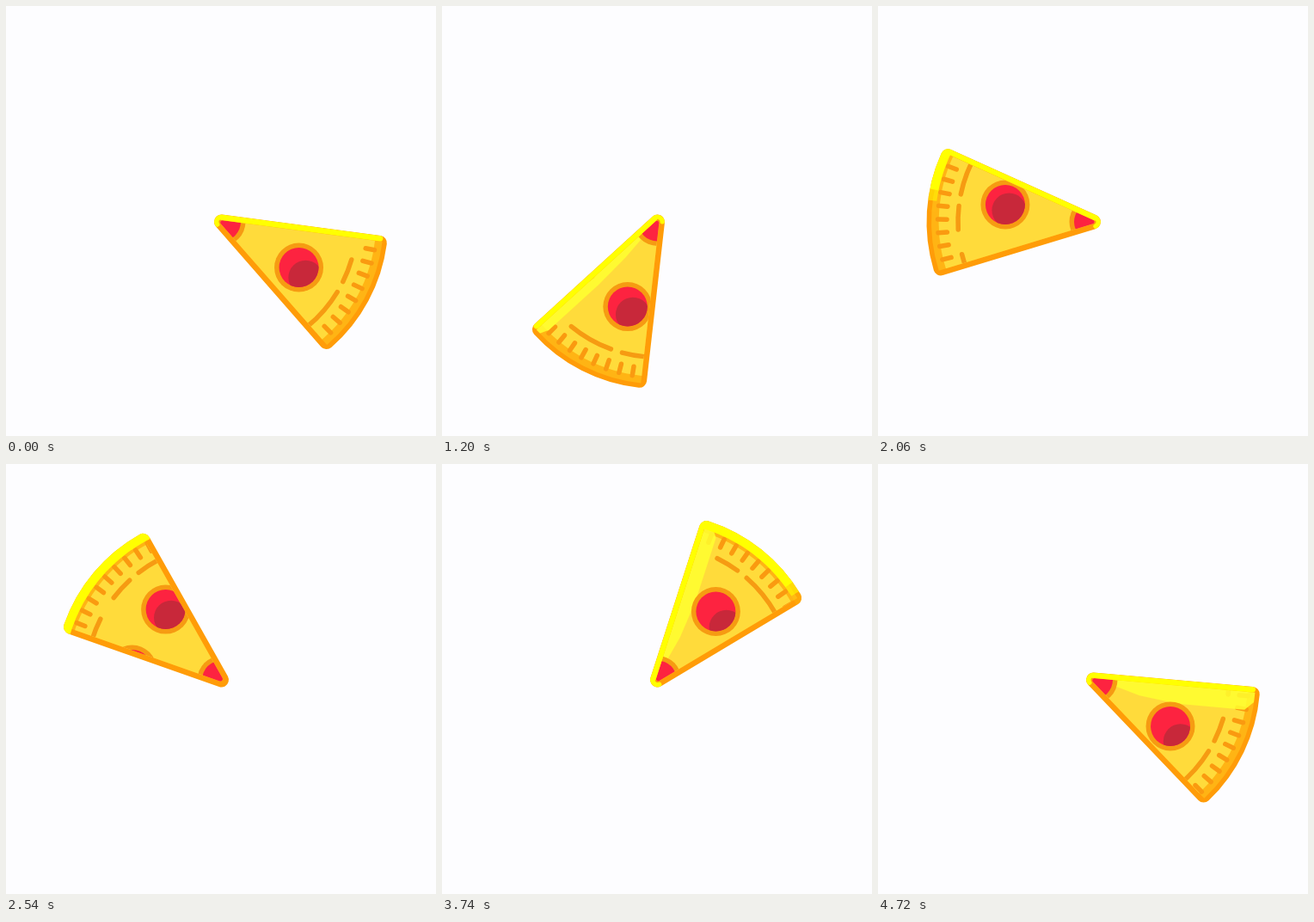
An HTML page with a canvas for the animation above (4.82 s loop, 500 by 500 pixels).

```html
<!DOCTYPE html>
<html lang="en">
<head>
<meta charset="utf-8">
<title>Pizza slice</title>
<style>
  html, body { margin: 0; width: 100%; height: 100%; overflow: hidden; background: #fdfdff; }
  canvas { display: block; width: 500px; height: 500px; }
</style>
</head>
<body>
<canvas id="stage" width="500" height="500"></canvas>
<script>
const ctx = document.getElementById('stage').getContext('2d');
const LOOP = 4820, STEPS = 81, TAU = Math.PI * 2;
const CX = 250.5, CY = 251;
const HALF = 20.6;      // half the opening angle of the slice
const RIM = 185.5, EDGE = 8.5;
const COL = {
  back: '#fdfdff', cheese: '#ffdb3b', crust: '#ffb414', line: '#ff9c08',
  tooth: '#fa9a10', ring: '#f69b12', red: '#fd2340', dark: '#c8283a',
  light: '#ffff00', glow: '#ffff30'
};

// step -> value, linear in between
const TURN = [[0, 28.2], [35, 183.7], [51, 256.3], [63, 308.5], [71, 345.7], [80, 385.7]];
const GLOW = [[0, 0], [13, 3], [20, 8], [35, 0], [51, 0], [63, 14], [80, 19]];
const SHADE = [[0, 14], [13, 13], [20, 11], [35, 8], [51, 15], [63, 22], [80, 21]];

// Steps alternate short and long, with two extra short ones.
const starts = [];
for (let i = 0, t = 0; i < STEPS; i++) {
  starts.push(t);
  const flips = (i >= 35) + (i >= 66);
  t += (i + flips) % 2 && i !== 35 && i !== 66 ? 100 : 20;
}

const rad = d => d * Math.PI / 180;
const clamp = v => Math.max(0, Math.min(1, v));
const polar = (r, d) => [r * Math.cos(rad(d)), r * Math.sin(rad(d))];

function at(table, x) {
  let k = 1;
  while (k < table.length - 1 && x > table[k][0]) k++;
  const [x0, y0] = table[k - 1], [x1, y1] = table[k];
  return y0 + (y1 - y0) * (x - x0) / (x1 - x0);
}

function disc(x, y, r, color) {
  ctx.fillStyle = color;
  ctx.beginPath();
  ctx.arc(x, y, r, 0, TAU);
  ctx.fill();
}

function ray(d, r0, r1, color, width) {
  ctx.strokeStyle = color;
  ctx.lineWidth = width;
  ctx.beginPath();
  ctx.moveTo(...polar(r0, d));
  ctx.lineTo(...polar(r1, d));
  ctx.stroke();
}

function bow(r, d0, d1, color, width) {
  ctx.strokeStyle = color;
  ctx.lineWidth = width;
  ctx.beginPath();
  ctx.arc(0, 0, r, rad(d0), rad(d1));
  ctx.stroke();
}

// How strongly a side with this outward direction catches the light.
const lit = normal => clamp((Math.cos(rad(normal - 258)) - 0.3) / 0.12);

function wedge(mid) {
  ctx.beginPath();
  ctx.moveTo(0, 0);
  ctx.arc(0, 0, RIM, rad(mid - HALF), rad(mid + HALF));
  ctx.closePath();
}

function clipInside(mid) {
  const [bx, by] = polar(-5.7, mid);
  const [ax, ay] = polar(188.5, mid - HALF - 0.6);
  const [zx, zy] = polar(188.5, mid + HALF + 0.6);
  ctx.beginPath();
  ctx.moveTo(ax, ay);
  ctx.arc(0, 0, 188.5, rad(mid - HALF - 0.6), rad(mid + HALF + 0.6));
  ctx.lineTo(zx, zy);
  ctx.arcTo(bx, by, ax, ay, 2.5);
  ctx.closePath();
  ctx.clip();
}

function pepperoni(d, shade) {
  const [x, y] = polar(104.5, d);
  disc(x, y, 28.5, COL.ring);
  disc(x, y, 23, COL.red);
  if (shade === null) return;
  ctx.save();
  ctx.beginPath();
  ctx.arc(x, y, 23, 0, TAU);
  ctx.clip();
  const [dx, dy] = polar(shade, 56);
  disc(x + dx, y + dy, 20, COL.dark);
  ctx.restore();
}

function glow(edge, side, width) {
  const amount = lit(edge + side * 90);
  if (width < 0.5 || !amount) return;
  ctx.save();
  ctx.globalAlpha = amount * 0.85;
  ctx.rotate(rad(edge));
  ctx.fillStyle = COL.glow;
  ctx.beginPath();
  ctx.moveTo(15, side * 6);
  ctx.lineTo(25, -side * width * 0.25);
  ctx.lineTo(55, -side * width * 0.7);
  ctx.lineTo(100, -side * width);
  ctx.lineTo(178, -side * width);
  ctx.lineTo(190, -side * width * 0.4);
  ctx.lineTo(190, side * 6);
  ctx.fill();
  ctx.restore();
}

function lightEdges(mid) {
  for (const side of [-1, 1]) {
    const edge = mid + side * HALF;
    ctx.save();
    ctx.globalAlpha = lit(edge + side * 90);
    ctx.rotate(rad(edge));
    ctx.strokeStyle = COL.light;
    ctx.lineWidth = 6.5;
    ctx.beginPath();
    ctx.moveTo(0, side * 5.25);
    ctx.lineTo(RIM, side * 5.25);
    ctx.stroke();
    ctx.restore();
  }
  ctx.save();
  ctx.lineCap = 'butt';
  const parts = 12, size = 2 * (HALF + 2.6) / parts;
  for (let k = 0; k < parts; k++) {
    const d = mid - HALF - 2.6 + k * size;
    ctx.globalAlpha = lit(d + size / 2);
    bow(189, d, d + size + 0.15, COL.light, 10.5);
  }
  ctx.restore();
}

function draw(step) {
  const mid = at(TURN, step);
  const spin = -45 * step / STEPS;
  const shade = at(SHADE, step), width = at(GLOW, step);

  ctx.setTransform(1, 0, 0, 1, 0, 0);
  ctx.fillStyle = COL.back;
  ctx.fillRect(0, 0, 500, 500);
  ctx.translate(CX, CY);
  ctx.lineCap = ctx.lineJoin = 'round';

  wedge(mid);
  ctx.fillStyle = ctx.strokeStyle = COL.line;
  ctx.lineWidth = EDGE * 2;
  ctx.fill();
  ctx.stroke();

  ctx.save();
  clipInside(mid);
  disc(0, 0, 190, COL.crust);
  disc(0, 0, 180, COL.cheese);
  for (let k = 0; k < 72; k++) ray(spin + 0.4 + k * 5, 170.5, 181, COL.tooth, 5.5);
  for (let k = 0; k < 8; k++) {
    const d = spin + k * 45;
    bow(157.5, d + 16.2, d + 26.2, COL.ring, 5.5);
    bow(157.5, d + 31.2, d + 50.6, COL.ring, 5.5);
  }
  glow(mid - HALF, -1, width);
  glow(mid + HALF, 1, width);
  for (let k = 0; k < 8; k++) {
    const d = spin + 30.5 + k * 45;
    const near = Math.cos(rad(d - mid)) > Math.cos(rad(22.5));
    pepperoni(d, near ? shade : null);
  }
  disc(0, 0, 28, COL.ring);
  disc(0, 0, 22.5, COL.red);
  ctx.restore();

  // Highlights stay within the rounded outline.
  ctx.save();
  ctx.beginPath();
  const [ax, ay] = polar(RIM, mid - HALF), [zx, zy] = polar(RIM, mid + HALF);
  ctx.arc(0, 0, EDGE, rad(mid + HALF + 90), rad(mid - HALF - 90));
  ctx.arc(ax, ay, EDGE, rad(mid - HALF - 90), rad(mid - HALF));
  ctx.arc(0, 0, RIM + EDGE, rad(mid - HALF), rad(mid + HALF));
  ctx.arc(zx, zy, EDGE, rad(mid + HALF), rad(mid + HALF + 90));
  ctx.closePath();
  ctx.clip();
  lightEdges(mid);
  // Round the lit tip.
  const tip = Math.max(lit(mid - HALF - 90), lit(mid + HALF + 90));
  ctx.globalAlpha = tip;
  ctx.strokeStyle = COL.light;
  ctx.lineWidth = 5.5;
  ctx.beginPath();
  ctx.arc(0, 0, 5.75, rad(mid + 120), rad(mid + 240));
  ctx.stroke();
  ctx.restore();
}

const begin = performance.now();
function tick() {
  const t = (performance.now() - begin) % LOOP;
  let step = STEPS - 1;
  while (step > 0 && starts[step] > t) step--;
  draw(step);
  requestAnimationFrame(tick);
}
tick();
</script>
</body>
</html>
```
